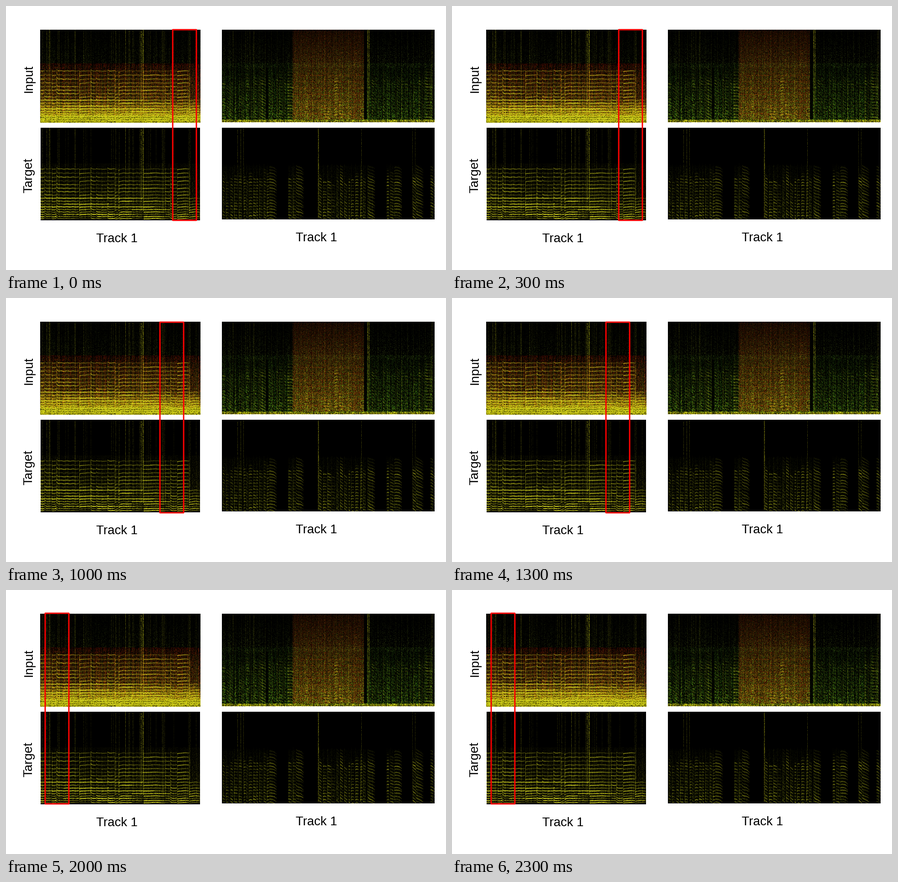
Animation of 966 by 579 pixels, one loop 2500 ms. Source, as a matplotlib script:

```python
import numpy as np
import matplotlib.pyplot as plt
from matplotlib.animation import FuncAnimation
from matplotlib.patches import Rectangle

W, H, DPI = 966, 579, 64
PT = 72 / DPI  # points per pixel
YELLOW = (0.9, 0.9, 0.13)
PANELS = ((75, 52, 427, 256), (76, 267, 426, 470),
          (474, 52, 941, 255), (474, 267, 941, 468))
MARKS = ((366, 52), (865, 53), (338, 53), (718.5, 52), (86, 51))
CHORDS = (76, 85, 101, 111, 161, 186, 198, 210, 223, 239, 247, 302, 350,
          361, 376, 402)
PHRASES = ((476, 594), (620, 653), (688, 810), (836, 869), (893, 916),
           (932, 941))

canvas = np.zeros((H, W, 3))
rng = np.random.default_rng(4)


def ridge(x0, ys, levels):
    """Add a thin bright curve, one y and one level per column."""
    top = int(ys.min()) - 3
    rows = np.arange(top, int(ys.max()) + 4)[:, None]
    glow = levels * np.exp(-((rows - ys) / 0.85) ** 2)
    canvas[top:top + len(rows), x0:x0 + len(ys)] += glow[..., None] * YELLOW


def notes(x0, x1, ys, levels, fall=0.0):
    """Stack of harmonics with a bent onset and an optional falling tail."""
    cols = np.arange(x1 - x0)
    t = cols / len(cols)
    drift = rng.uniform(-4, 4) * np.exp(-cols / 2.5) + fall * t ** 2
    drift += 0.5 * np.sin(cols * rng.uniform(0.15, 0.5))
    for y, level in zip(ys, levels):
        flicker = rng.uniform(0.7, 1.1, len(t)) * (1 - 0.6 * t ** 4)
        ridge(x0, y + drift * rng.uniform(0.5, 1.1),
              level * rng.uniform(0.4, 1.2) * flicker)


def haze(x0, y0, x1, y1, color, power=2, ramp=(1, 1), columns=0.5):
    """Speckled noise whose columns differ in strength."""
    h, w = y1 - y0, x1 - x0
    grain = rng.random((h, w)) ** power * (power + 1)
    grain *= 1 - columns + 2 * columns * rng.random(w)
    grain *= np.linspace(*ramp, h)[:, None]
    canvas[y0:y1, x0:x1] += grain[..., None] * np.array(color) / 255


def streaks(xs, y0, y1, peak, ramp=(1, 1)):
    for x in xs:
        amp = peak * rng.uniform(0.4, 1)
        haze(x, y0, x + 1, y1, (amp, amp, amp * 0.12), 1, ramp, 0)


def sung(x0, x1, top, base, amp, fall=3):
    """Vocal harmonics, strong at the bottom and around one formant."""
    ys = np.arange(base, top, -6.6)
    depth = (base - ys) / (base - top)
    formant = 0.45 * np.exp(-((ys - base + 80) / 11) ** 2)
    notes(x0, x1, ys, amp * (0.85 - 0.6 * depth + formant), fall)


def beats(x0, x1, top, base, amp):
    """Run of short syllables with narrow dark gaps."""
    x = x0
    while x < x1 - 3:
        end = min(x + int(rng.integers(4, 9)), x1)
        sung(x, end, top + rng.uniform(0, 40), base,
             amp * rng.uniform(0.45, 1.2))
        streaks([x], top, base, 40, (0.2, 1.2))
        x = end + int(rng.integers(1, 5))


def left_target():
    k = np.arange(17)
    ys = 357 + 9.2 * k - 0.15 * k ** 2
    for x0, x1 in zip(CHORDS, CHORDS[1:]):
        amp = rng.uniform(0.45, 0.7) + 0.1 * (x1 - x0 > 25)
        notes(x0, x1, ys, amp * np.linspace(0.75, 1.3, len(ys)))
    notes(402, 426, ys[8:], np.full(9, 0.7))
    # long held tones
    for y in ys[8:]:
        x0, x1 = sorted(rng.choice(np.arange(76, 426, 25), 2, replace=False))
        ridge(x0, np.full(x1 - x0, y), rng.uniform(0.3, 0.7, x1 - x0))

    streaks(CHORDS, 355, 450, 80, (0.6, 1))
    streaks(rng.integers(78, 420, 40), 267, 450, 26)
    streaks((89, 95, 262, 270, 278, 293), 267, 440, 50, (1, 0.5))
    streaks((296, 297, 300, 301), 267, 450, 95, (1, 0.6))
    haze(76, 345, 426, 465, (15, 15, 2), 2, (0.3, 1.2), 0.8)
    canvas[468:470, 76:426] *= 0.1


def left_input():
    """Same music, with red noise and a bright floor on top."""
    canvas[52:255, 75:427] = canvas[267:470, 75:427]
    haze(75, 52, 427, 126, (4, 5, 1), 4, (0.3, 1.5), 0.9)
    haze(75, 126, 427, 242, (26, 5, 1), 2, (0.9, 1.2), 0.7)
    haze(75, 140, 427, 242, (14, 14, 2), 2, (0.3, 1.6))
    haze(75, 205, 427, 256, (62, 60, 4), 1, (0, 1.9), 0.25)
    haze(75, 239, 427, 256, (50, 48, 4), 1, columns=0.25)


def right_input():
    haze(474, 52, 941, 135, (3, 4, 1), 5, (0.2, 2), 0.9)
    haze(474, 125, 941, 252, (9, 19, 3), 3, (0.4, 1.5), 0.7)
    streaks(range(478, 940, 13), 52, 250, 20, (0.5, 1.6))
    for x0, x1 in ((475, 571), (577, 632), (795, 937)):
        beats(x0, x1, 134, 249, 0.42)
        sung(x1 - 14, x1, 136, 249, 0.5, 6)

    # dense noise burst
    haze(629, 52, 786, 249, (44, 8, 1), 1, (0.45, 1.2), 0.25)
    haze(629, 52, 786, 249, (12, 19, 2), 2, (0.2, 1.7), 0.4)
    for y in range(151, 240, 14):
        haze(629, y, 786, y + 2, (18, 2, 0), 1, columns=0.1)
    sung(697, 711, 205, 249, 0.6)
    sung(721, 730, 136, 249, 0.6)
    sung(731, 743, 200, 249, 0.5)

    for x0, x1, y0 in ((571, 575, 135), (786, 792, 52), (937, 940, 135)):
        canvas[y0:248, x0:x1] *= 0.2
    streaks((498, 526, 535, 544, 935), 52, 248, 50, (1, 0.5))
    streaks((793, 794, 796, 797), 52, 248, 90, (1, 0.5))
    haze(474, 249, 941, 255, (110, 106, 6), 1, (0.6, 1.3), 0.6)


def right_target():
    for x0, x1 in PHRASES:
        tail = max(x1 - 16, x0)
        beats(x0, tail, 346, 464, 0.75)
        sung(tail, x1, 348, 464, 0.68, 8)
        haze(x0, 350, x1 - 4, 466, (6, 7, 1), 3, (0.4, 1.5), 0.9)
    streaks((508, 515, 521, 780, 892, 898), 267, 440, 50, (1, 0.5))
    streaks((685, 686), 267, 464, 75)


def paint():
    for draw in (left_target, left_input, right_input, right_target):
        draw()
    page = np.ones((H, W, 3))
    for x0, y0, x1, y1 in PANELS:
        page[y0:y1, x0:x1] = np.clip(canvas[y0:y1, x0:x1], 0, (0.8, 0.8, 0.13))
    return page


fig = plt.figure(figsize=(W / DPI, H / DPI), dpi=DPI, facecolor="white")
ax = fig.add_axes([0, 0, 1, 1])
ax.imshow(paint(), extent=(0, W, H, 0), interpolation="none", aspect="auto")
ax.set(xlim=(0, W), ylim=(H, 0))
ax.axis("off")

for label, x, y, angle in (("Track 1", 243.5, 518, 0),
                           ("Track 1", 681.5, 516.5, 0),
                           ("Input", 58, 159.5, 90), ("Target", 57, 372, 90)):
    ax.text(x, y, label, family="Liberation Sans", size=27.6 * PT,
            color="black", rotation=angle, rotation_mode="anchor",
            ha="center", va="baseline")

mark = ax.add_patch(Rectangle(MARKS[0], 52, 418, fill=False, ec="#ff0000",
                              lw=3 * PT, joinstyle="round", snap=False))


def update(i):
    mark.set_xy(MARKS[i])
    return (mark,)


anim = FuncAnimation(fig, update, frames=len(MARKS), interval=500, repeat=True)
plt.show()
```
